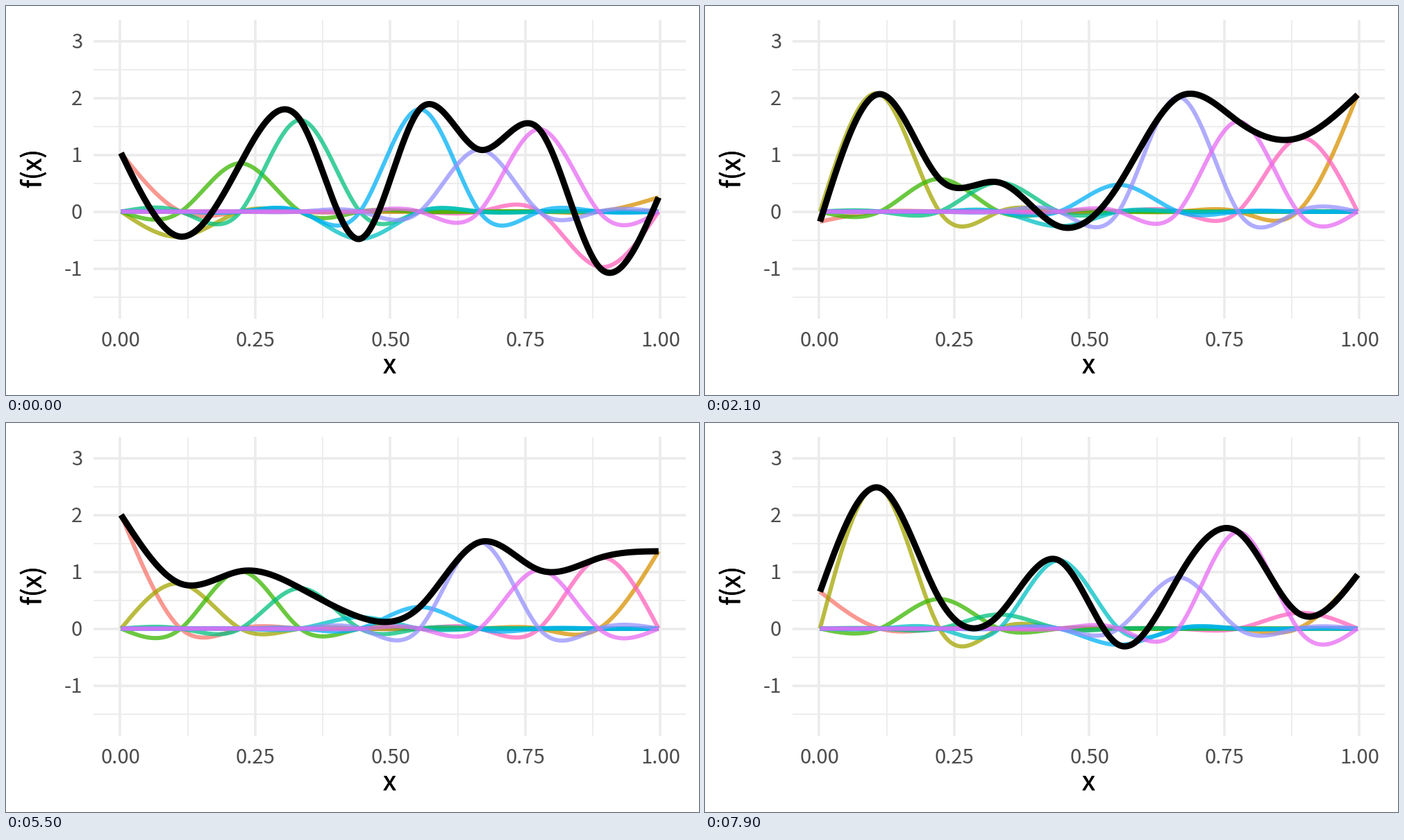
Animation of 998x561 px, one loop 8000 ms. Source, as a matplotlib script:

```python
import numpy as np
import matplotlib.pyplot as plt
from matplotlib.animation import FuncAnimation
from matplotlib.patheffects import withStroke

W, H, DPI = 998, 561, 100
FRAMES, INTERVAL = 80, 100
PT = 72 / DPI  # points per pixel

N_BASIS = 10
STEPS = 9  # frames per transition
STARTS = [3, *range(14, FRAMES, 10)]

# Key curves, by their height at each knot; states without one lie halfway
# between their neighbours.
KEY_CURVES = {
    0: [1.03, -0.44, 0.85, 1.61, -0.48, 1.80, 1.09, 1.45, -0.97, 0.25],
    1: [1.38, 1.69, 2.22, 0.76, 2.23, -0.42, 0.27, 1.13, 2.64, 0.17],
    2: [-0.19, 2.07, 0.56, 0.51, -0.28, 0.48, 2.03, 1.59, 1.28, 2.07],
    3: [0.91, 0.65, 0.35, 1.75, 0.75, 0.92, 0.60, 0.11, 1.19, 0.07],
    5: [2.00, 0.79, 1.01, 0.71, 0.20, 0.38, 1.52, 1.03, 1.24, 1.36],
    6: [1.20, -1.10, -0.47, 2.41, 0.64, -0.26, 1.16, 1.63, 1.06, 2.30],
    8: [0.56, 3.05, 0.68, -0.10, 1.29, -0.29, 0.86, 1.71, 0.15, 0.73],
}
STATES = np.transpose([
    np.interp(range(len(STARTS) + 1), list(KEY_CURVES), heights)
    for heights in zip(*KEY_CURVES.values())
])


def px(x):
    return 164.5 + 778 * x


def py(y):
    return 296.5 - 82 * y


def hcl(hue, chroma=100, light=65):
    """Polar CIE-LUV colour as sRGB."""
    angle = np.radians(hue)
    u = 0.1978 + chroma * np.cos(angle) / (13 * light)
    v = 0.4683 + chroma * np.sin(angle) / (13 * light)
    y = ((light + 16) / 116) ** 3
    xyz = y * np.array([9 * u, 4 * v, 12 - 3 * u - 20 * v]) / (4 * v)
    to_rgb = [[3.2405, -1.5371, -0.4985], [-0.9693, 1.8760, 0.0416],
              [0.0556, -0.2040, 1.0572]]
    linear = np.clip(to_rgb @ xyz, 0, 1)
    return np.where(linear > 0.00304, 1.055 * linear ** (1 / 2.4) - 0.055,
                    12.92 * linear)


def natural_spline_basis(x, knots):
    """Columns are natural cubic splines equal to 1 at one knot, 0 at the rest."""
    n, h = len(knots), knots[1] - knots[0]
    eye = np.eye(n)
    system = 4 * np.eye(n - 2) + np.eye(n - 2, k=1) + np.eye(n - 2, k=-1)
    curvature = np.zeros((n, n))
    curvature[1:-1] = np.linalg.solve(system, 6 / h**2 * np.diff(eye, 2, axis=0))
    j = np.clip(((x - knots[0]) / h).astype(int), 0, n - 2)
    b = ((x - knots[j]) / h)[:, None]
    a = 1 - b
    return (a * eye[j] + b * eye[j + 1]
            + h**2 / 6 * ((a**3 - a) * curvature[j] + (b**3 - b) * curvature[j + 1]))


def quintic_in_out(t):
    return 16 * t**5 if t < 0.5 else 1 - 16 * (1 - t)**5


def weights_at(frame):
    weights = STATES[0]
    for start, target in zip(STARTS, STATES[1:]):
        t = np.clip((frame - start) / STEPS, 0, 1)
        weights = weights + quintic_in_out(t) * (target - weights)
    return weights


plt.rcParams["font.family"] = "Noto Sans CJK JP"
fig = plt.figure(figsize=(W / DPI, H / DPI), dpi=DPI, facecolor="white")
ax = fig.add_axes([0, 0, 1, 1])
ax.set(xlim=(0, W), ylim=(H, 0))
ax.axis("off")

LEFT, RIGHT, TOP, BOTTOM = 126.5, 979, 19.5, 450.5


def grid(xs, ys, width):
    style = dict(color="#EBEBEB", linewidth=width * PT, zorder=1)
    ax.vlines([px(x) for x in xs], TOP, BOTTOM, **style)
    ax.hlines([py(y) for y in ys], LEFT, RIGHT, **style)


def label(x, y, text, size=29.3, ha="center", color="#4D4D4D", **kwargs):
    ax.text(x, y, text, fontsize=size * PT, ha=ha, va="baseline", color=color,
            **kwargs)


def title(x, y, text, rotation=0):
    label(x, y, text, size=37.5, color="black", rotation=rotation,
          rotation_mode="anchor",
          path_effects=[withStroke(linewidth=0.6 * PT, foreground="black")])


x_ticks, y_ticks = np.arange(5) / 4, np.arange(-1, 4)
grid(x_ticks[:-1] + 0.125, y_ticks - 0.5, 1.75)
grid(x_ticks, y_ticks, 3.5)
for tick in x_ticks:
    label(px(tick), 490.5, f"{tick:.2f}")
for tick in y_ticks:
    label(110, py(tick) + 10.5, str(tick), ha="right")
title(552.5, 529.5, "x")
title(50.5, 235, "f(x)", rotation=90)

x_min, x_max = 0.0015, 0.9965
xs = np.linspace(x_min, x_max, 400)
basis = natural_spline_basis(xs, np.linspace(x_min, x_max, N_BASIS))


def curve(color, width, **kwargs):
    return ax.plot([], [], color=color, linewidth=width * PT,
                   solid_capstyle="butt", solid_joinstyle="round", **kwargs)[0]


# Hues follow the alphabetical order of the names: 1, 10, 2, 3, ...
names = sorted(range(1, N_BASIS + 1), key=str)
colors = {name - 1: hcl(15 + 360 / N_BASIS * i) for i, name in enumerate(names)}
draw_order = [0, N_BASIS - 1, N_BASIS - 2, *range(1, N_BASIS - 2)]
parts = {k: curve(colors[k], 6, alpha=0.75, zorder=3) for k in draw_order}
total = curve("black", 9, zorder=4)


def update(frame):
    weights = weights_at(frame)
    for k, line in parts.items():
        line.set_data(px(xs), py(weights[k] * basis[:, k]))
    total.set_data(px(xs), py(basis @ weights))
    return [*parts.values(), total]


anim = FuncAnimation(fig, update, frames=FRAMES, interval=INTERVAL,
                     repeat=True, repeat_delay=0, blit=False)
plt.show()
```
